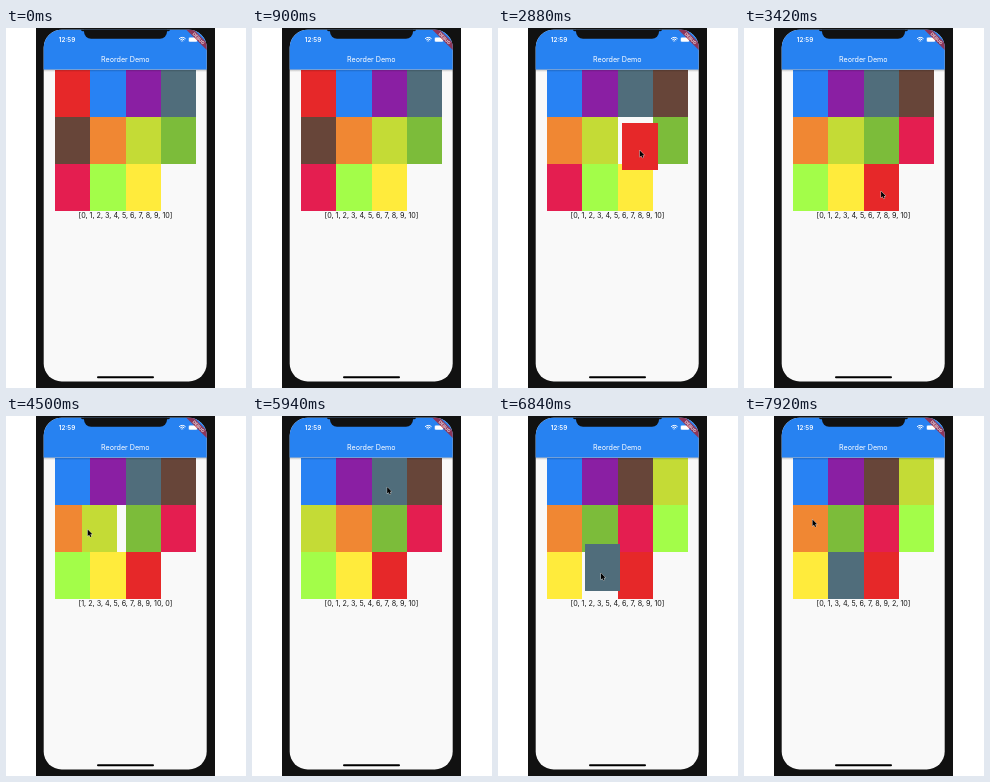
These frames come from a looping animation (240x360 px, 8000 ms). An HTML page with a canvas:

```html
<!DOCTYPE html>
<html lang="en">
<head>
<meta charset="utf-8">
<title>Reorder Demo</title>
<style>
html, body { margin: 0; width: 100%; height: 100%; overflow: hidden; background: #fff; }
canvas { display: block; width: 240px; height: 360px; }
</style>
</head>
<body>
<canvas id="stage"></canvas>
<script>
const LOOP = 8000, STEP = 180, GLIDE = 300, APPEAR = 1260;
const FONT = 'Inter, Roboto, sans-serif';
const COLS = 4, TILE_W = 35.25, TILE_H = 47, GRID_X = 49, GRID_Y = 42;
const COLORS = ['#e62829', '#2882f3', '#8a1fa3', '#506d7b', '#674539', '#f08733',
  '#c4db36', '#7cbc3a', '#e41e50', '#a3fd49', '#ffeb3c'];

// Slot moves; grip is the pointer's place in the tile, bend curves the way there
const HOME = [65.3, 64.3];
const DRAGS = [
  { from: 0, to: 10, start: 2290, end: 3470, grip: [17.5, 27.5], bend: [95, 0] },
  { from: 5, to: 4, start: 4420, end: 5080, grip: [5.5, 24.5] },
  { from: 2, to: 9, start: 5940, end: 7210, grip: [15.7, 29] },
  { from: 4, to: 4, start: 7920, end: LOOP, grip: [19.5, 14.5] }
];

const canvas = document.getElementById('stage');
const ctx = canvas.getContext('2d');
const ratio = window.devicePixelRatio || 1;
canvas.width = 240 * ratio;
canvas.height = 360 * ratio;

const clamp = (v, max) => Math.max(0, Math.min(max, v));
const progress = (t, a, b) => clamp((t - a) / (b - a), 1);
const add = (a, b) => a.map((v, i) => v + b[i]);
const mix = (a, b, k) => a.map((v, i) => v + (b[i] - v) * k);
const slotPos = i => [GRID_X + i % COLS * TILE_W, GRID_Y + Math.floor(i / COLS) * TILE_H];

function nearestSlot([x, y]) {
  const col = clamp(Math.round((x - GRID_X) / TILE_W), COLS - 1);
  const row = clamp(Math.round((y - GRID_Y) / TILE_H), 2);
  return Math.min(COLORS.length - 1, row * COLS + col);
}

function move(list, from, to) {
  const next = list.slice();
  next.splice(to, 0, ...next.splice(from, 1));
  return next;
}

// Place of the dragged tile: an eased quadratic curve between two slots
function dragPos({ from, to, start, end, bend }, t) {
  const k = 1 - (1 - progress(t, start, end)) ** 2;
  const a = slotPos(from), b = slotPos(to);
  const c = bend ? add(a, bend) : mix(a, b, 0.5);
  return mix(mix(a, c, k), mix(c, b, k), k);
}

// Everything that depends on time: order, label, floating tile, pointer
function scene(t) {
  const ids = COLORS.map((_, i) => i);
  let order = ids, label = ids, held = null, pointer = HOME;
  for (const drag of DRAGS) {
    const { from, to, start, end, grip } = drag;
    const pos = dragPos(drag, t);
    pointer = mix(pointer, add(pos, grip), progress(t, start - GLIDE, start));
    if (t < start) break;
    if (t < end) {
      held = { id: order[from], pos };
      order = move(order, from, nearestSlot(pos));
      break;
    }
    order = move(order, from, to);
    label = move(ids, from, to);
  }
  return { order, label, held, pointer };
}

function box(color, x, y, w, h, r = 0) {
  ctx.fillStyle = color;
  ctx.beginPath();
  ctx.roundRect(x, y, w, h, r);
  ctx.fill();
}

function text(str, x, y, size, weight, color) {
  ctx.font = `${weight} ${size}px ${FONT}`;
  ctx.textAlign = 'center';
  ctx.fillStyle = color;
  ctx.fillText(str, x, y);
}

function tile(id, [x, y]) {
  const left = Math.round(x);
  box(COLORS[id], left, Math.round(y), Math.round(x + TILE_W) - left, TILE_H);
}

function appBar() {
  const shade = ctx.createLinearGradient(0, 41, 0, 44);
  shade.addColorStop(0, 'rgba(0,0,0,.28)');
  shade.addColorStop(1, 'rgba(0,0,0,0)');
  box(shade, 37, 41, 165, 3);
  box('#2782f1', 37, 1, 165, 40.5);
  text('Reorder Demo', 119.3, 33.5, 7.15, 400, '#fff');
  text('12:59', 61, 14, 6.3, 600, '#fff');
}

function statusIcons() {
  ctx.strokeStyle = '#fff';
  ctx.lineWidth = 1;
  for (let r = 1.2; r < 5; r += 1.7) {
    ctx.beginPath();
    ctx.arc(176.3, 14, r, -Math.PI * 0.75, -Math.PI * 0.25);
    ctx.stroke();
  }
  box('rgba(255,255,255,.5)', 182.5, 9.3, 9, 4.8, 1.4);
  box('#fff', 183, 9.8, 8, 3.8, 1);
  box('#fff', 192, 10.9, 0.7, 1.6, 0.3);
}

function banner() {
  ctx.save();
  ctx.translate(201, 2);
  ctx.rotate(Math.PI / 4);
  box('rgba(175,28,40,.75)', -17.4, 9.2, 34.8, 5.2);
  text('DEBUG', 0, 13.3, 4.3, 700, 'rgba(255,255,255,.8)');
  ctx.restore();
}

function notch() {
  box('#111', 78, -8, 83, 18.8, 7);
  box('#111', 75, 0, 89, 3.2, 1.6);
}

const ARROW = new Path2D('M0 0V6.6L1.5 5.2 2.5 7.4 3.6 6.9 2.6 4.8H4.6Z');

function arrow([x, y]) {
  ctx.translate(x, y);
  ctx.lineWidth = 0.8;
  ctx.strokeStyle = '#ddd';
  ctx.stroke(ARROW);
  ctx.fillStyle = '#000';
  ctx.fill(ARROW);
}

function draw(t) {
  const { order, label, held, pointer } = scene(t);
  ctx.setTransform(ratio, 0, 0, ratio, 0, 0);
  box('#fff', 0, 0, 240, 360);
  box('#111', 30, 0, 179, 360);

  ctx.save();
  ctx.beginPath();
  ctx.roundRect(37.7, 1.7, 163, 351.7, 18);
  ctx.clip();
  box('#f9f9f9', 37, 1, 165, 353);
  order.forEach((id, i) => {
    if (!held || held.id !== id) tile(id, slotPos(i));
  });
  text(`[${label.join(', ')}]`, 119.5, 190.3, 7.2, 400, '#151515');
  appBar();
  statusIcons();
  if (held) tile(held.id, held.pos);
  banner();
  notch();
  box('#000', 91, 348.2, 57, 2, 1);
  ctx.restore();

  if (t >= APPEAR) arrow(pointer);
}

// The picture advances in fixed steps
function tick() {
  const t = performance.now() % LOOP;
  draw(Math.floor(t / STEP) * STEP);
  requestAnimationFrame(tick);
}
tick();
</script>
</body>
</html>
```
